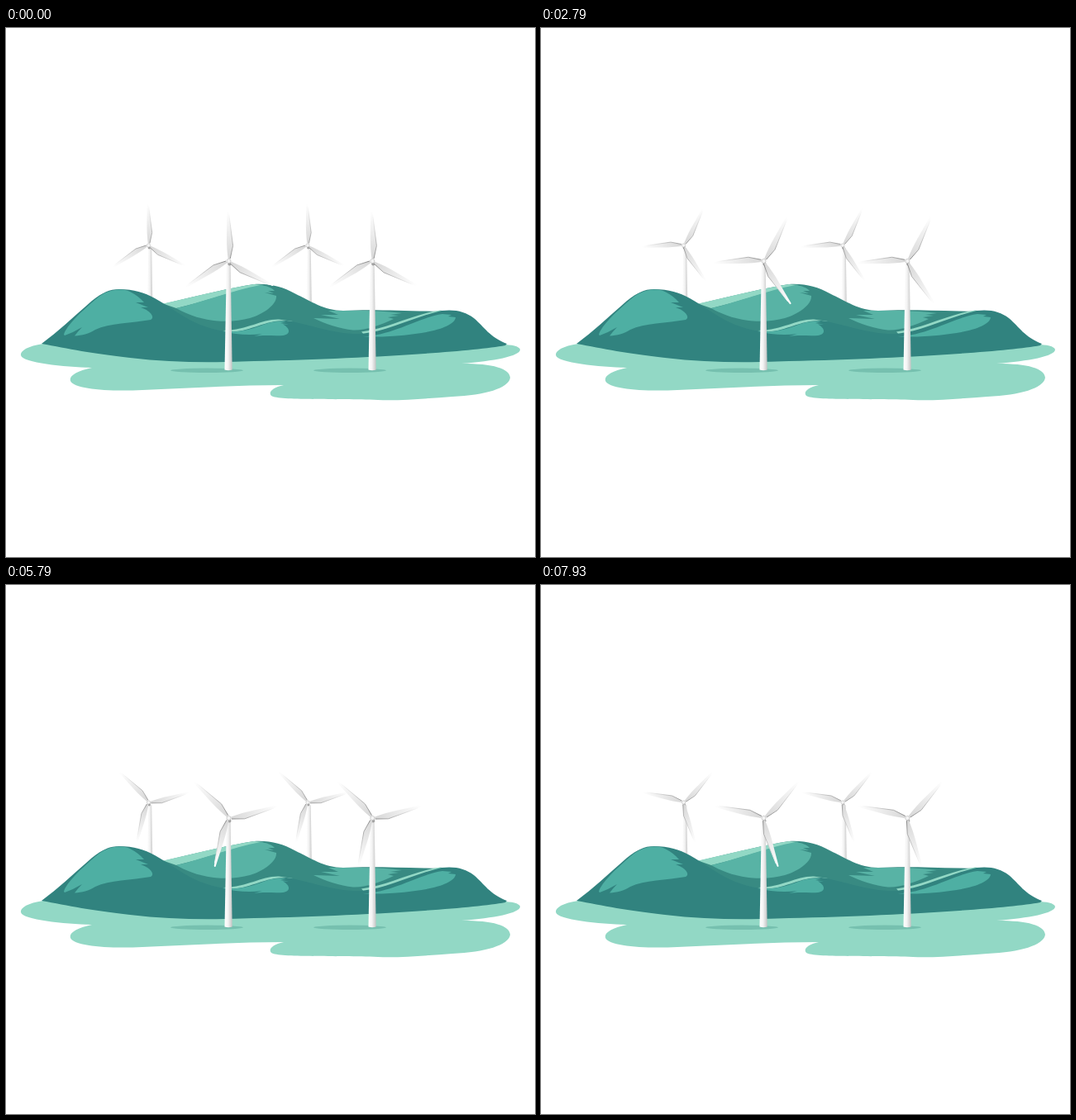
Recreate the animation shown at these times as an HTML page. Size 640x640 px, loop 8000 ms.

```html
<!DOCTYPE html>
<html lang="en">
<head>
<meta charset="utf-8">
<title>Wind farm</title>
<style>
  html, body { margin: 0; width: 100%; height: 100%; overflow: hidden; background: #fff; }
  svg { display: block; width: 100vw; height: 100vh; }
  .water { fill: #92d8c5; }
  .shade { fill: #76c0af; }
  .far { fill: #388a82; }
  .far-lit { fill: #58b3a5; }
  .near { fill: #31837f; }
  .near-lit { fill: #4eafa3; }
</style>
</head>
<body>
<svg viewBox="0 0 640 640">
  <defs>
    <linearGradient id="towerFill">
      <stop offset="0" stop-color="#fff"/>
      <stop offset=".45" stop-color="#f4f4f4"/>
      <stop offset="1" stop-color="#c4c4c4"/>
    </linearGradient>
    <linearGradient id="bladeFill" gradientUnits="userSpaceOnUse" x1="2" y1="-4" x2="-1" y2="-61">
      <stop offset="0" stop-color="#d8d8d8"/>
      <stop offset=".4" stop-color="#e8e8e8"/>
      <stop offset="1" stop-color="#fff"/>
    </linearGradient>
    <linearGradient id="edgeFill" gradientUnits="userSpaceOnUse" x1="0" y1="-3" x2="0" y2="-58">
      <stop offset="0" stop-color="#7c7c7c"/>
      <stop offset=".4" stop-color="#b0b0b0"/>
      <stop offset="1" stop-color="#fff"/>
    </linearGradient>
    <g id="blade">
      <path fill="url(#bladeFill)" d="M-.8-3C-1.9-12-2.3-22-1.9-32L-1.1-60.5Q-.2-62.5 .9-60.500L5.4-18.5L1.8-3Z"/>
      <path fill="none" stroke="url(#edgeFill)" stroke-width=".8" d="M1.8-3L5.4-18.500L1.2-57"/>
    </g>
    <path id="tower" fill="url(#towerFill)" d="M-2.3 4H2.5L4.5 131.5Q0 133-4.7 131.5Z"/>
  </defs>

  <path class="water" d="M45 382C25 385 17 391 18 396C20 405 70 410 104 411C85 415 76 421 78 427C82 437 125 440 165 438C220 436 280 432 336 432C322 435 317 441 321 445C330 451 400 448 450 450C480 451 510 448 540 446C580 444 608 436 610 423C609 412 590 406 551 406C590 403 622 397 622 389C621 385 612 383 600 383Z"/>

  <g id="back"></g>

  <path class="far" d="M190 334C228 325 268 315 300 310C320 309 334 313 350 321.500C368 330 385 342 408 342C440 340 480 342 528 343L520 385H230Z"/>
  <path class="water" d="M190 333.5C228 325 268 315 300 310L312 311C278 317 244 330 206 339Z"/>
  <path class="far-lit" d="M206 339C240 331 275 317 308 311C316 312 321 314 325 318L317 318L324 321L313 320L327 324C328 334 312 346 295 351C270 358 235 356 206 339Z"/>
  <path class="far-lit" d="M390 342C420 342 450 341 479 345L465 347L475 348L462 350L469 352C454 359 436 366 420 365.500C404 364 386 358 372 351L404 352L381 347L402 347Z"/>
  <path class="water" d="M262 366C295 365 308 352 330 352.500L347 355L335 360L275 369Z"/>
  <path class="water" d="M430 367.500C462 364 490 347 525 341.500L535 343L500 360L434 372Z"/>

  <path class="near" d="M43 382C62 368 80 351 104 330C117 320 125 316 137 316C155 316 167 320 180 327C200 338 215 351 235 359C250 365 262 367 275 367.500C298 366 312 354 339 354C368 358 395 371 430 370C462 367 492 350 527 342C543 340 556 343 566 351C579 362 585 374 606 382L604 384C560 392 430 400 300 403C250 405 200 405 150 399C105 394 75 388 43 382Z"/>
  <path class="near-lit" d="M70 371C73 360 92 342 110 327C122 317 138 314 150 319Q160 324 167 332L157 332L172 338L163 338C177 343 180 351 175 353C152 357 125 357 108 365C100 370 92 372 83 372.500Q87 367 92 362Q82 368 71 372Z"/>
  <path class="near-lit" d="M262 367C296 370 310 356 329 355L339 355L332 357L342 358.500L335 358.500C345 364 344 371 335 372C325 373 313 371 300 373L310 370C295 372 278 371 262 367Z"/>
  <path class="near-lit" d="M432 373.500C470 371 500 350 528 346L539 347L535 349L544 350C543 360 520 367 495 370C474 373 452 374 432 373.500Z"/>

  <ellipse class="shade" cx="243" cy="414.300" rx="44" ry="2.700"/>
  <ellipse class="shade" cx="416" cy="414.300" rx="44" ry="2.700"/>
  <g id="front"></g>
</svg>
<script>
  const LOOP = 8000;
  const SHOWN_FPS = 14, MOTION_FPS = 25;
  const START = -1, SPIN = 3.843;   // degrees, degrees per motion step

  const blades = [0, 120, 240].map(a => `<use href="#blade" transform="rotate(${a})"/>`).join('');

  function addTurbine(layer, x, y, scale, towerShift) {
    document.getElementById(layer).insertAdjacentHTML('beforeend', `
      <g transform="translate(${x} ${y}) scale(${scale})">
        <use href="#tower" x="${towerShift}"/>
        <ellipse cx=".9" cy="3.2" rx="2" ry="2.2" fill="#a2a2a2"/>
        <g class="rotor">${blades}</g>
        <circle r="2.6" fill="#f4f4f4" stroke="#b4b4b4" stroke-width=".6"/>
      </g>`);
  }

  addTurbine('back', 172.5, 263, 0.83, 2);
  addTurbine('back', 365, 263, 0.83, 2);
  addTurbine('front', 269.5, 282, 1, -0.3);
  addTurbine('front', 443.3, 282, 1, -0.1);

  const rotors = document.querySelectorAll('.rotor');

  // The rotors move in 25 fps steps, of which 14 per second are shown.
  function draw(time) {
    const shown = Math.floor((time + 5) % LOOP * SHOWN_FPS / 1000);
    const angle = START + SPIN * Math.ceil(shown * MOTION_FPS / SHOWN_FPS);
    for (const rotor of rotors) rotor.setAttribute('transform', `rotate(${angle})`);
  }

  let begin;
  function tick(now) {
    begin ??= now;
    draw(now - begin);
    requestAnimationFrame(tick);
  }
  draw(0);
  requestAnimationFrame(tick);
</script>
</body>
</html>
```
